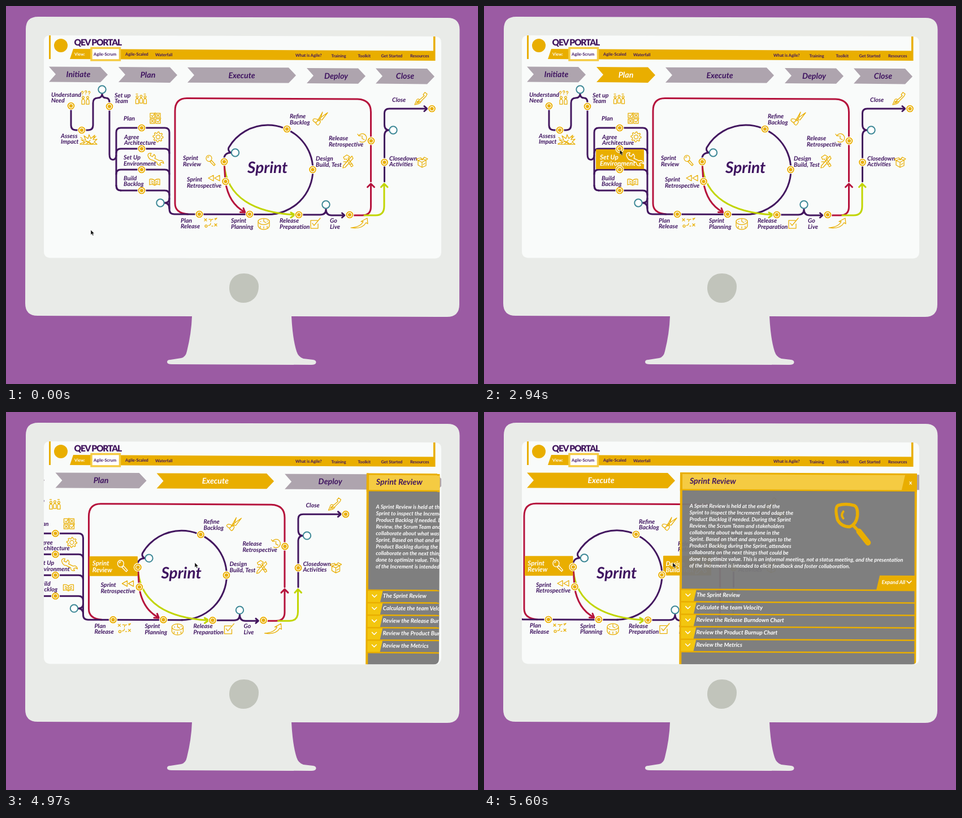
Write an HTML page that moves like this. It is 835 by 670 pixels and loops after 6090 ms.

```html
<!DOCTYPE html>
<html lang="en">
<head>
<meta charset="utf-8">
<title>Agile portal</title>
<style>
html, body { margin: 0; width: 100%; height: 100%; overflow: hidden; background: #9b5ba3 }
svg { display: block; width: 835px; height: 670px; font-family: Lato, "Open Sans", sans-serif; font-weight: 700; text-rendering: geometricPrecision }
.it { font-style: italic }
.line { fill: none; stroke-width: 3; stroke-linecap: round; stroke-linejoin: round }
.icon { fill: none; stroke: currentColor; stroke-width: 1.25; stroke-linecap: round; stroke-linejoin: round; color: #e9ae00 }
.label { font-size: 10.7px; fill: #3f1460 }
</style>
</head>
<body>
<svg id="stage" viewBox="0 0 835 670"></svg>
<script>
const LOOP = 6090, STEP = 70, TILT = 0.0055;
const PURPLE = [63, 20, 96], GREY = [174, 164, 174], GOLD = [233, 174, 0], WHITE = [255, 255, 255];
const gold = '#e9ae00', light = '#f5cb42', purple = '#43175f', red = '#b5123c', green = '#c1d500';

const clamp = v => Math.max(0, Math.min(1, v));
const ramp = (t, a, b) => clamp((t - a) / (b - a));
const smooth = p => p * p * (3 - 2 * p);
const mix = (a, b, p) => a + (b - a) * p;
const blend = (a, b, p) => `rgb(${a.map((v, i) => Math.round(mix(v, b[i], p)))})`;
const $ = id => document.getElementById(id);
const line = (d, color = purple) => `<path class="line" stroke="${color}" d="${d}"/>`;
const text = (x, y, s, size, fill, extra = '') =>
  `<text x="${x}" y="${y}" font-size="${size}" fill="${fill}" ${extra}>${s}</text>`;
const person = (x, y) => `M${x - 2.5} ${y + 9}v-5q0-4 2.5-4t2.5 4v5zM${x - 1.8} ${y - 3}a1.8 2 0 1 0 3.6 0a1.8 2 0 1 0-3.6 0`;
const ask = (x, y) => `M${x - 1.5} ${y - 2}q0-2 1.6-2t1.5 2q0 1-1.6 2.5M${x} ${y + 2.6}v.1`;
const square = (x, y) => `M${x} ${y}h8v8h-8z`;
const gear = Array.from({ length: 32 }, (_, i) => {
  const a = i * Math.PI / 16, r = i % 4 < 2 ? 9 : 6.6;
  return `${i ? 'L' : 'M'}${(r * Math.cos(a)).toFixed(1)} ${(r * Math.sin(a)).toFixed(1)}`;
}).join('') + 'zM-3.5 0a3.5 3.5 0 1 0 7 0a3.5 3.5 0 1 0-7 0';

const icons = {
  ask: person(-4.5, 3) + person(3.5, 3) + ask(-6, -7) + ask(0, -8) + ask(6, -7),
  impact: 'M-15 7L-7 4-13 0-5 1-8-7-1-2 1-9 4-2 11-8 8 0 15-1 10 4 15 8H-15M-9 7Q-5 1 0 5T9 6M-4 2L4 6M3 1L-3 7M-14-4l3 2M13-6l-3 3',
  team: person(-7, 0) + person(0, -1) + person(7, 0) + 'M-9-8h3M5-8h3',
  tasks: square(-9, -9) + square(1, -9) + square(-9, 1) + square(1, 1) +
    'M-7-5l2 2 5-7M3-7l4 4M7-7l-4 4M-7 3l4 4M-3 3l-4 4M3 5l2 2 5-7',
  gear,
  wrench: 'M-14-6Q-14-11-8-10L-10-6-6-4-3-8Q1-4-2-1L6 3Q13 1 14 8L10 6 7 8 9 11Q2 12 2 6L-6 2Q-12 2-14-6z',
  book: 'M0-3Q-4-6-9-5V5Q-4 3 0 6Q4 3 9 5V-5Q4-6 0-3V6M-6-2l4 2M-6 1l4 2M6-2L2 0M6 1L2 3',
  lens: 'M-7-4a5 5.5 0 1 0 10 0a5 5.5 0 1 0-10 0M1 1L3 0 9 7 7 9 0 2M-4-5q0-2 2-2',
  rewind: 'M-1-5L-10 0-1 5zM10-5L1 0 10 5z',
  scissors: 'M-4 2L13-10 3 3-6 2M-4 3L4-11-1 4M-13 4q0-4 5-3t3 4-5 2zM-8 9q2-5 6-5t1 5-5 2z',
  tools: 'M-8-7L-2-11 3-8 0-5 9 8 6 10-3-4-6-3zM7-9L9-5-5 11-9 12-8 8 5-7zM-8 1h5M2 5h6',
  history: 'M-6-4A7.5 7.5 0 1 1-4 6M-6-4l-2-3M-6-4l4 0M0-4V1L4 3',
  box: 'M-7-3L0 0 7-4V6L0 9-7 5zM0 0V9M-7-3L-10-6-2-8 0-4 4-9 10-6 7-4M-7-3L0-6 7-4M2 4l3-2',
  spade: 'M11-8L7-11 4-7 6-5-2 2Q-7-1-8 4L-11 11Q-2 10 0 6L1 4 9-4zM-7 6l4-3M-5 8l4-3M-8 9l5-5',
  plan: 'M-11-7l4 4M-7-7l-4 4M7 2l4 4M11 2L7 6M-10 6a2 2 0 1 0 4 0a2 2 0 1 0-4 0M-4 5q4 0 4-4M0-2q0-4 4-4M7-7l4-1M8-5l3-3M-3-6h3M2 6h2',
  dial: 'M-10-4a10 5.5 0 1 0 20 0a10 5.5 0 1 0-20 0V4Q-8 10 0 10T10 4V-4M0-8V-4L4-2M-6-4h1M6-5h1M-6 4v3M0 5v3M6 4v3',
  check: 'M4-5H-8V9H5V1M-5 0L-2 4 9-9',
  rise: 'M-15 8Q2 7 7-3L3-3 14-9 15 1 12-1Q5 11-15 8z'
};

const labels = [
  ['need', 80, 160.5, 'Understand|Need', 141, 162, 'ask'],
  ['assess', 97, 233.5, 'Assess|Impact', 146, 237, 'impact'],
  ['team', 192, 161.5, 'Set up|Team', 239, 164, 'team'],
  ['plan', 208, 202.5, 'Plan', 264, 199, 'tasks'],
  ['agree', 209, 235.5, 'Agree|Architecture', 269, 232, 'gear'],
  ['setup', 208, 272, 'Set Up|Environment', 265, 271, 'wrench'],
  ['build', 208, 308.5, 'Build|Backlog', 263, 312, 'book'],
  ['review', 313, 273, 'Sprint|Review', 361, 274, 'lens'],
  ['retro', 320, 311, 'Sprint|Retrospective', 368, 305, 'rewind'],
  ['refine', 502, 199, 'Refine|Backlog', 556, 199, 'scissors'],
  ['design', 548, 274, 'Design|Build, Test', 605, 275, 'tools'],
  ['release', 571, 238, 'Release|Retrospective', 630, 234, 'history'],
  ['closedown', 678, 273.5, 'Closedown|Activities', 736, 277, 'box'],
  ['close', 683, 169.5, 'Close', 734, 164, 'spade'],
  ['planning', 309, 383.5, 'Plan|Release', 362, 384, 'plan'],
  ['sprint', 398, 384, 'Sprint|Planning', 456, 386, 'dial'],
  ['prep', 484, 384, 'Release|Preparation', 547, 385, 'check'],
  ['live', 573, 384, 'Go|Live', 625, 385, 'rise']
];

// Hover box, label shift, then times of fading in and out
const hovers = {
  build: { box: [198, 291, 85.5, 35], shift: [0, -1], times: [1470, 1960, 2430, 2800] },
  setup: { box: [198, 254, 85, 35], shift: [0, 0], times: [2430, 2730, 2980, 3320] },
  agree: { box: [199, 218, 84, 34], shift: [0, 0], times: [2980, 3260, 3500, 3880] },
  review: { box: [300, 256.5, 85.5, 35], shift: [-5, 0], times: [3780, 4340, 9000, 9001] },
  design: { box: [545, 256, 85, 35], shift: [5, 0], times: [5460, 5600, 9000, 9001] }
};

const nodes = [[115, 177], [134, 220], [183, 178], [240, 216], [240, 253], [240, 290], [240, 327], [342, 369],
  [431, 369], [386, 276], [388.5, 311], [497, 218], [542.5, 290], [518, 370], [608, 370], [646, 239], [669.5, 277], [753.5, 182]];
const gates = [[170, 148], [273, 349], [405.5, 260], [566, 352], [685, 220]];
const phases = ['Initiate', 'Plan', 'Execute', 'Deploy', 'Close'];

const tracks =
  line('M322 369Q299 367 299 350V186Q299 163.500 320 163.500L622 165Q645.500 166 645.500 188V311', red) +
  line('M608 371H630Q645.500 371 645.500 356V317M639.500 321L645.500 315 651.500 321', red) +
  line('M634 371H654Q669 371 669 355V317M663.500 321L669 315 675 321', green) +
  line('M115 177V211Q115 220 124 220H145Q154 220 154 211V172Q154 163 162 163Q170 163 170 155Q170 163 177 163Q183 163 183 171V263Q183 272.500 189 272.500Q195 272 195 264') +
  line('M203 327Q195 327 195 318V224Q195 216 203 216H281Q289 216 289 224V360Q289 369 298 369L465 369.500') +
  [253, 290, 327].map(y => line(`M195 ${y < 300 ? y + 8 : y - 9}Q195 ${y} 203 ${y}H281Q289 ${y} 289 ${y + 8}`)).join('') +
  line('M280 349Q289 349 289 341M280 349Q289 349 289 359') +
  line('M386 275V268Q388 260 398 260Q392 257 394 251A80 79 0 0 1 463 211A80 79.300 0 0 1 463 369.600') +
  line('M518 370H556Q566 370 566 360Q566 371 576 371H598M594.500 367L599 371 594.500 375') +
  line('M669.500 311V230Q669.500 220 678 220Q669.500 220 669.500 210V190Q669.500 182 678 182H744M740 177.500L745 182 740 186.500') +
  line('M386 280C390 340 440 366 510 370M504 366L511 370 504 375', green) +
  line('M386 278L388 311Q394 350 422 365M414.500 365.500L423 366 420 358.500', red);

const labelMarkup = ([id, x, y, s, ix, iy, icon]) => `<g id="${id}" class="label it">` +
  s.split('|').map((part, i) => `<text x="${x}" y="${y + i * 10.5}">${part}</text>`).join('') +
  `<path class="icon" transform="translate(${ix} ${iy})" d="${icons[icon]}"/></g>`;

const menu = [[121, 88, 'View:', '#fff'], [155, 88, 'Agile-Scrum'], [211, 88, 'Agile-Scaled'], [264, 88.5, 'Waterfall'],
  [512, 90, 'What is Agile?'], [575.5, 90.5, 'Training'], [622.5, 90.5, 'Toolkit'], [663.5, 90.5, 'Get Started'], [715, 91, 'Resources']];

const story = ['A Sprint Review is held at the end of the', 'Sprint to inspect the Increment and adapt the',
  'Product Backlog if needed. During the Sprint', 'Review, the Scrum Team and stakeholders',
  'collaborate about what was done in the', 'Sprint. Based on that and any changes to the',
  'Product Backlog during the Sprint, attendees', 'collaborate on the next things that could be',
  'done to optimize value. This is an informal meeting, not a status meeting, and the presentation',
  'of the Increment is intended to elicit feedback and foster collaboration.'];
const rows = ['The Sprint Review', 'Calculate the team Velocity', 'Review the Release Burndown Chart',
  'Review the Product Burnup Chart', 'Review the Metrics'];
const rowTop = i => 313 + i * 22.1;

const panel = `<g transform="rotate(.29 0 106)" class="it">
  <path fill="${gold}" d="M-1 107H418V140H-1z"/>
  <path fill="${light}" d="M3 110H397L391 136.500H3z"/>
  <path fill="#7a7a7a" fill-opacity=".955" d="M2 139H416V460H2z"/>
  <path fill="${gold}" d="M-1 107H3V460H-1zM418 107V460H415L414 139zM353 288H416V314H347z"/>
  ${text(16, 127, 'Sprint Review', 14.2, purple)}
  ${text(404, 126.5, 'x', 10, '#fff', 'style="font-style:normal"')}
  ${story.map((s, i) => text(16, 169.6 + i * 11.75, s, 9.6, '#fff')).join('')}
  ${text(356.5, 303, 'Expand All', 9.3, '#fff')}
  <path class="line" style="stroke-width:1.5" stroke="#fff" d="M401 297.500l4 4 4-4"/>
  ${rows.map((s, i) => {
    const y = rowTop(i) + 1;
    return `<path fill="#f3c60f" d="M2 ${y}H29L24 ${y + 22}H2z"/>
      <path class="line" style="stroke-width:1.5" stroke="#fff" d="M10 ${y + 8.5}l4 4 4-4"/>` + text(29, y + 13.4, s, 10.2, '#fff');
  }).join('')}
  ${[0, 1, 2, 3, 4, 5].map(i => `<path fill="${gold}" d="M0 ${rowTop(i)}h416v2.500h-416z"/>`).join('')}
  <g fill="none" stroke="${gold}" stroke-width="5.500" stroke-linejoin="round" stroke-linecap="round">
    <path d="M279 164Q292 160 307 164Q314 167 313 182Q311 198 299 202Q285 202 278 190Q272 167 279 164z"/>
    <path stroke-width="4" d="M288 187Q283 181 288 175"/>
    <path d="M306 200L313 207"/><path stroke-width="10" d="M316 210L332 230"/>
  </g></g>`;

$('stage').innerHTML = `
  <defs>
    <clipPath id="screen"><path d="M79 52L758 54Q770 54 770 65V436Q770 447.500 758 447.500L79 446.500Q67 446 67 435V63Q67 52 79 52z"/></clipPath>
    <clipPath id="edge"><path d="M67 90H767.500L766 437Q766 447.500 756 447.500H67z"/></clipPath>
  </defs>
  <path fill="#9b5ba3" d="M0 0H835V670H0z"/>
  <path fill="#e9ebe8" d="M57 19L781 21Q803 21 802.500 43L802 529Q802 551 780 551L505 550Q507 590 514 612Q517 622 526 625L543 627Q549 628 548.500 632Q548 636 540 636L293 635Q285 635 285 631Q285 627 291 627L310 624Q318 622 320 612Q328 580 329 550L56 549Q34 549 34 527L35 41Q35 19 57 19z"/>
  <path fill="#c1c4bb" d="M421 474C437 474 447 485 447 497C447 514 436 526 420 526C405 526 395 514 395 500C395 485 405 474 421 474z"/>
  <g clip-path="url(#screen)">
    <path fill="#f9fbfa" d="M60 45H780V455H60z"/>
    ${phases.map(p => `<g id="phase${p}"><polygon/><text class="it" font-size="14.2" text-anchor="middle">${p}</text></g>`).join('')}
    <g id="map">
      ${tracks}
      ${Object.entries(hovers).map(([id, { box: [x, y, w, h] }]) =>
        `<rect id="${id}Box" x="${x}" y="${y}" width="${w}" height="${h}" rx="1" fill="${gold}"/>`).join('')}
      ${nodes.map(([x, y]) => `<circle cx="${x}" cy="${y}" r="7.600" fill="#fff"/><circle cx="${x}" cy="${y}" r="5.400" fill="#fff" stroke="${gold}" stroke-width="1.900"/><circle cx="${x}" cy="${y}" r="3.100" fill="${gold}"/>`).join('')}
      ${gates.map(([x, y]) => `<circle cx="${x}" cy="${y}" r="6.700" fill="#fff" stroke="#3d8896" stroke-width="2"/>`).join('')}
      ${labels.map(labelMarkup).join('')}
      ${text(427, 296, 'Sprint', 28, '#3f1460', 'class="it"')}
    </g>
    <g clip-path="url(#edge)"><g id="panel">${panel}</g></g>
    <path fill="${gold}" d="M76 52H79V94H76zM756 54H759.500V97H756zM119 76L759 79.500V97L113 94z"/>
    <path fill="#fff" stroke="${light}" stroke-width="3.500" d="M151 74.500H201.500V96H151z"/>
    <circle cx="97" cy="70" r="12" fill="${gold}"/>
    ${text(120.5, 69.5, 'QEV PORTAL', 15.5, purple, 'font-weight="900" letter-spacing="-1.2"')}
    ${menu.map(([x, y, s, fill = '#3f1460']) => text(x, y, s, 7.4, fill)).join('')}
  </g>
  <path id="cursor" d="M0 0V8.500L2 6.700 3.500 10 5 9.300 3.500 6.200H6.200z" fill="#111" stroke="#fff" stroke-width=".4"/>`;

function drawPhase(name, x, w, lit) {
  const y = 107.4 + (x - 76) * TILT, r = x + w;
  const [shape, label] = $('phase' + name).children;
  shape.setAttribute('points', `${x},${y} ${r - 13},${y + .5} ${r},${y + 14.3} ${r - 13},${y + 27.8} ${x},${y + 27} ${x + 12},${y + 13.7}`);
  shape.setAttribute('fill', blend(GREY, GOLD, lit));
  label.setAttribute('x', x + w / 2);
  label.setAttribute('y', y + 18.8);
  label.setAttribute('fill', blend(PURPLE, WHITE, lit));
}

function drawHover(id, t) {
  const { box: [x, y, w, h], shift, times: [a, b, c, d] } = hovers[id];
  const lit = ramp(t, a, b) - ramp(t, c, d), k = 1 + .09 * lit;
  const cx = x + w / 2, cy = y + h / 2;
  $(id + 'Box').setAttribute('opacity', lit);
  const g = $(id);
  g.setAttribute('transform', `translate(${cx + shift[0] * lit} ${cy + shift[1] * lit}) scale(${k}) translate(${-cx} ${-cy})`);
  g.style.fill = blend(PURPLE, WHITE, lit);
  g.lastChild.style.color = blend(GOLD, WHITE, lit);
}

function cursorAt(t) {
  if (t < 2240) {
    const p = smooth(ramp(t, 1120, 1750));
    return [mix(150, 230, p), mix(397, 308, p)];
  }
  if (t < 2720) {
    const p = smooth(ramp(t, 2240, 2720));
    return [mix(230, 232, p), mix(308, 262, p)];
  }
  const p = smooth(ramp(t, 2720, 3990));
  const curve = (a, b, c) => mix(mix(a, b, p), mix(b, c, p), p);
  return [curve(232, 284, 334), curve(262, 214, 267)];
}

function draw(now) {
  const t = Math.floor(now % LOOP / STEP) * STEP;
  const slide = ramp(t, 4830, 5460);

  const left = 321 - 245 * slide, width = 192 + 70 * slide, side = 104 + 257 * slide;
  const planLeft = left - 18 - side, deployLeft = left + width + 19;
  drawPhase('Initiate', planLeft - 123, 104, 0);
  drawPhase('Plan', planLeft, side, ramp(t, 1330, 1750) - ramp(t, 3430, 3710));
  drawPhase('Execute', left, width, ramp(t, 3780, 4340));
  drawPhase('Deploy', deployLeft, side, 0);
  drawPhase('Close', deployLeft + side + 18, 104, 0);

  const mapX = -228 * (1 - (1 - slide) ** 4.4);
  $('map').setAttribute('transform', `translate(${mapX} ${mapX * TILT})`);
  const panelX = 770 - 422 * (1 - (1 - slide) ** 1.48);
  $('panel').setAttribute('transform', `translate(${panelX} ${(panelX - 348) * TILT})`);
  $('panel').style.display = slide ? '' : 'none';

  Object.keys(hovers).forEach(id => drawHover(id, t));
  $('cursor').setAttribute('transform', `translate(${cursorAt(t)})`);
}

const start = performance.now();
function tick() {
  draw(performance.now() - start);
  requestAnimationFrame(tick);
}
tick();
</script>
</body>
</html>
```
